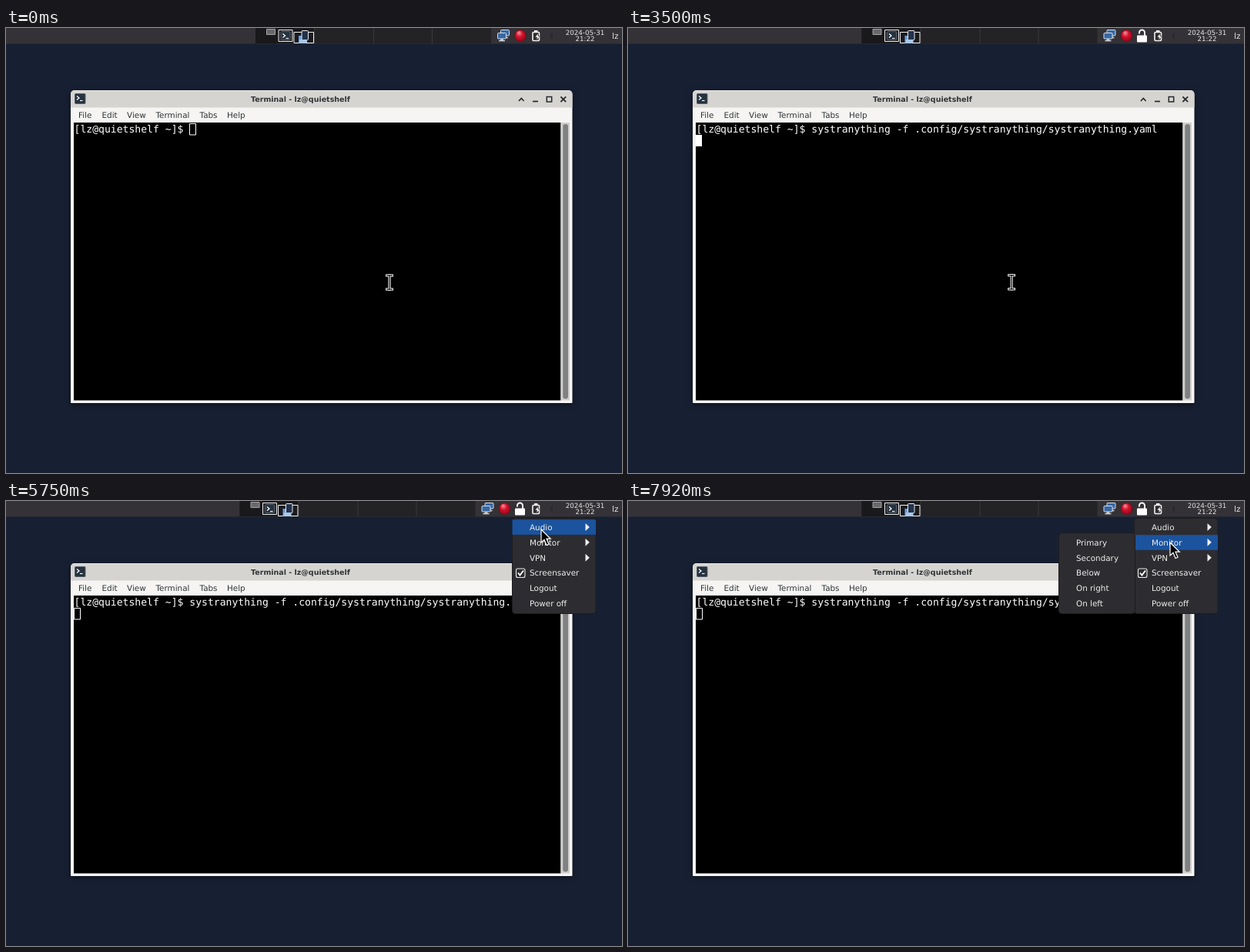
Recreate the animation shown at these times as an HTML page with a canvas. Size 800 px wide and 579 px high, loop 8000 ms.

```html
<!DOCTYPE html>
<html lang="en">
<head>
<meta charset="utf-8">
<title>Tray menu demo</title>
<style>
html, body { margin: 0; width: 100%; height: 100%; overflow: hidden; background: #172033; }
canvas { display: block; }
</style>
</head>
<body>
<canvas id="stage" width="800" height="579"></canvas>
<script>
const ctx = document.getElementById('stage').getContext('2d');
const LOOP = 8000, FRAME = 1000 / 12;
const UI = '"DejaVu Sans", sans-serif', MONO = '"DejaVu Sans Mono", monospace';
const PROMPT = '[lz@quietshelf ~]$ ';
const COMMAND = 'systranything -f .config/systranything/systranything.yaml ';
const CELL = 7.89, LINE = 15, TERM_X = 88.5;

// Times in ms at which the picture changes
const AT = { focus: 245, type: 245, typed: 1330, enter: 1990, tray: 2160,
  toTray: 3490, atTray: 4080, menu: 5240, toAudio: 5330, atAudio: 5660, audio: 5825,
  toMonitor: 6900, atMonitor: 7240, monitor: 7325 };

const MENU = ['Audio', 'Monitor', 'VPN', 'Screensaver', 'Logout', 'Power off'];
const AUDIO = ['Laptop', 'Headphones', 'Zilpo Bluetooth', 'Monitor USB C', 'Monitor HDMI',
  'Monitor other', 'Laptop builtin', 'Laptop headphones', 'USB headphones'];
const MONITOR = ['Primary', 'Secondary', 'Below', 'On right', 'On left'];

const clamp = v => Math.max(0, Math.min(1, v));
const progress = (t, from, to) => clamp((t - from) / (to - from));
const ease = p => p * p * (3 - 2 * p);

function rect(x, y, w, h, fill) {
  ctx.fillStyle = fill;
  ctx.fillRect(x, y, w, h);
}
function box(x, y, w, h, r, fill, stroke, width = 1) {
  ctx.beginPath();
  ctx.roundRect(x, y, w, h, r);
  paint(fill, stroke, width);
}
function paint(fill, stroke, width = 1) {
  if (fill) { ctx.fillStyle = fill; ctx.fill(); }
  if (stroke) { ctx.strokeStyle = stroke; ctx.lineWidth = width; ctx.stroke(); }
}
function shape(points, fill, stroke, width, closed = true) {
  ctx.beginPath();
  points.forEach(([x, y]) => ctx.lineTo(x, y));
  if (closed) ctx.closePath();
  paint(fill, stroke, width);
}
function line(points, stroke, width) { shape(points, null, stroke, width, false); }
function disc(x, y, r, fill, stroke, width) {
  ctx.beginPath();
  ctx.arc(x, y, r, 0, 7);
  paint(fill, stroke, width);
}
function text(str, x, y, size, color, family = UI, weight = '', align = 'left') {
  ctx.font = `${weight} ${size}px ${family}`;
  ctx.textRendering = 'geometricPrecision';
  ctx.textAlign = align;
  ctx.fillStyle = color;
  ctx.fillText(str, x, y);
}
function at(x, y, draw) {
  ctx.save();
  ctx.translate(x, y);
  draw();
  ctx.restore();
}

function terminalIcon(x, y, w, h) {
  at(x, y, () => {
    box(.5, .5, w - 1, h - 1, 1, '#25323f', '#56636d');
    line([[3, 3.5], [6, 6], [3, 8.5]], '#fff', 1.3);
    line([[7, 9.5], [10.5, 9.5]], '#fff', 1.2);
  });
}

function pager() {
  rect(0, 0, 306, 20, '#232225');
  rect(0, 0, 76, 20, '#19181a');
  for (const x of [76, 153, 229]) rect(x, 0, 1, 20, '#39383b');
  box(14.5, 1.5, 11, 7, 0, '#69686b', '#a3a2a5');
  box(30, 2.5, 18, 15, 0, '#242326', '#e8e8e8');
  terminalIcon(32.5, 4, 13, 12);
  box(50, 5.5, 25.5, 14, 0, '#1b1a1d', '#f2f2f2');
  rect(56, 10, 10, 9.5, '#6f9fd6');
  box(60, 3.5, 8.5, 12, 1, '#23334b', '#e6edf5');
  rect(57, 15, 10, 4, '#a9c8ea');
}

function networkIcon() {
  const screen = (x, y) => {
    box(x + .5, y + .5, 11, 7.5, 1, '#3868a4', '#d5dce3');
    rect(x + 4, y + 8, 4, 2, '#c3c8cc');
    rect(x + 2, y + 10, 8, 1.3, '#d5dce3');
  };
  screen(642, 2);
  screen(638, 6);
}

function recordIcon() {
  const glow = ctx.createRadialGradient(666, 6, 1, 668, 10, 9);
  glow.addColorStop(0, '#f07b88');
  glow.addColorStop(.4, '#d3122c');
  glow.addColorStop(1, '#8c0018');
  disc(668, 10, 7.6, glow, '#5a1a22', 1);
}

function batteryIcon() {
  box(684, 5.5, 8.5, 11, 1, '#2c2b2e', '#f4f4f4', 1.6);
  rect(686, 3, 4.5, 2.5, '#f4f4f4');
  shape([[691, 7], [687, 12], [689.7, 12], [688.5, 16], [694, 10.5], [691, 10.5]], '#fff', '#2c2b2e', .6);
}

function lockIcon() {
  ctx.beginPath();
  ctx.moveTo(664, 7.5);
  ctx.lineTo(664, 6);
  ctx.arc(667.5, 6, 3.5, Math.PI, 0);
  ctx.lineTo(671, 11);
  paint(null, '#fff', 2);
  box(661, 9.5, 13, 9, 1, '#fff');
}

function panel(t) {
  const hasLock = t >= AT.tray, shift = hasLock ? -20.5 : 0;
  rect(0, 0, 800, 20.5, '#343236');
  at(324 + shift, 0, pager);
  at(shift, 0, () => { networkIcon(); recordIcon(); });
  if (hasLock) lockIcon();
  batteryIcon();
  rect(707, 7, 3, 7, '#2b2a2d');
  text('2024-05-31', 752, 9.2, 8.7, '#e4e4e4', UI, '', 'center');
  text('21:22', 752, 17.4, 8.7, '#e4e4e4', UI, '', 'center');
  text('lz', 787, 13.6, 10.4, '#e4e4e4');
}

function windowFrame() {
  ctx.save();
  ctx.shadowColor = 'rgba(0,0,0,.5)';
  ctx.shadowBlur = 7;
  ctx.shadowOffsetY = 2;
  box(84, 81, 651.5, 407, [5, 5, 1, 1], '#f6f5f4');
  ctx.restore();
  box(84, 81, 651.5, 22.5, [5, 5, 0, 0], '#d6d4d1');
  rect(88, 81, 643, 1, '#eceae8');
  terminalIcon(89, 85, 14.5, 14);
  text('Terminal - lz@quietshelf', 382.5, 96.3, 9.5, '#2f3436', UI, 'bold', 'center');
  const ink = '#25292b';
  line([[666, 95], [669.3, 91.5], [672.6, 95]], ink, 1.7);
  line([[684, 95.5], [691, 95.5]], ink, 1.7);
  box(702.3, 89.5, 6.4, 6.4, 0, null, ink, 1.5);
  line([[720.4, 89.3], [727.2, 96.1]], ink, 1.8);
  line([[727.2, 89.3], [720.4, 96.1]], ink, 1.8);
  [['File', 94], ['Edit', 124.5], ['View', 157], ['Terminal', 194.5], ['Tabs', 251.5], ['Help', 287]]
    .forEach(([label, x]) => text(label, x, 116.8, 10.4, '#2e3436'));
  rect(88, 123, 632.5, 361.5, '#000');
  rect(720.5, 123, 11.5, 361.5, '#d2d0ce');
  box(723.3, 125, 6.7, 357.5, 3.3, '#7f8081');
}

function terminal(t) {
  windowFrame();
  const entered = t >= AT.enter;
  const typed = COMMAND.slice(0, Math.round(COMMAND.length * progress(t, AT.type, AT.typed)));
  text(PROMPT + typed, TERM_X, 135.9, 13.1, '#fff', MONO);
  const x = entered ? TERM_X : TERM_X + CELL * (PROMPT.length + typed.length);
  const y = 124 + (entered ? LINE : 0);
  const focused = t >= AT.focus && t < AT.menu;
  if (focused) rect(Math.round(x - .4), y, 8, 15, '#fff');
  else box(Math.round(x - .4) + .5, y + .5, 8, 14.5, 0, null, '#fff');
}

const menuBox = (x, y, w, h) => box(x + .5, y + .5, w - 1, h - 1, 4, '#2d2c30', '#1d1c1f');
const rowY = i => 34 + 19.85 * i;
const label = (str, x, y) => text(str, x, y + 3.8, 10.4, '#eeeeec');

function mainMenu(active) {
  menuBox(657, 22, 109.5, 125);
  if (active >= 0) rect(657.5, rowY(active) - 9.7, 108.5, 19.6, '#1b539e');
  MENU.forEach((name, i) => {
    const y = rowY(i);
    label(name, 680, y);
    if (i < 3) shape([[752.5, y - 5], [757.8, y], [752.5, y + 5]], '#eeeeec');
  });
  box(662.5, 88, 11.5, 11.5, 2, null, '#eeeeec', 1.1);
  line([[665, 93.5], [667.5, 96.5], [672, 90.5]], '#fff', 1.9);
}

function audioMenu() {
  menuBox(513, 22, 146, 184);
  AUDIO.forEach((name, i) => {
    const y = rowY(i);
    disc(524, y, 5.8, null, '#eeeeec', 1.1);
    if (i === 3 || i === 8) disc(524, y, 3, '#fff');
    label(name, 535, y);
  });
}

function monitorMenu() {
  menuBox(559, 41, 100, 106);
  MONITOR.forEach((name, i) => label(name, 582, rowY(i + 1)));
}

function pointerAt(t) {
  const stops = [[AT.toTray, AT.atTray, 670, 3], [AT.toAudio, AT.atAudio, 695, 37],
    [AT.audio, AT.audio + 80, 696, 37], [AT.toMonitor, AT.atMonitor, 704, 54]];
  let x = 498, y = 331;
  for (const [from, to, nx, ny] of stops) {
    const p = ease(progress(t, from, to));
    x += (nx - x) * p;
    y += (ny - y) * p;
  }
  return { x, y };
}

function pointer({ x, y }) {
  at(x, y, () => {
    if (y > 123) {
      const bars = [[[-3.3, -9], [3.3, -9]], [[0, -9], [0, 9]], [[-3.3, 9], [3.3, 9]]];
      ctx.lineCap = 'square';
      for (const bar of bars) line(bar, '#fff', 3.2);
      for (const bar of bars) line(bar, '#000', 1.2);
    } else {
      shape([[0, 0], [0, 17], [4, 13.3], [7, 20.5], [10, 19.2], [7, 12.2], [12.3, 12.2]], '#000', '#fff', 1.2);
    }
  });
}

function draw(t) {
  rect(0, 0, 800, 579, '#172033');
  panel(t);
  terminal(t);
  const mouse = pointerAt(t);
  if (t >= AT.menu) {
    const active = mouse.y < 24 ? -1 : mouse.y < 44 ? 0 : 1;
    mainMenu(active);
    if (active === 0 && t >= AT.audio) audioMenu();
    if (active === 1 && t >= AT.monitor) monitorMenu();
  }
  pointer(mouse);
}

function tick() {
  const t = performance.now() % LOOP;
  draw(Math.floor((t + 4) / FRAME) * FRAME % LOOP);
  requestAnimationFrame(tick);
}
tick();
</script>
</body>
</html>
```
